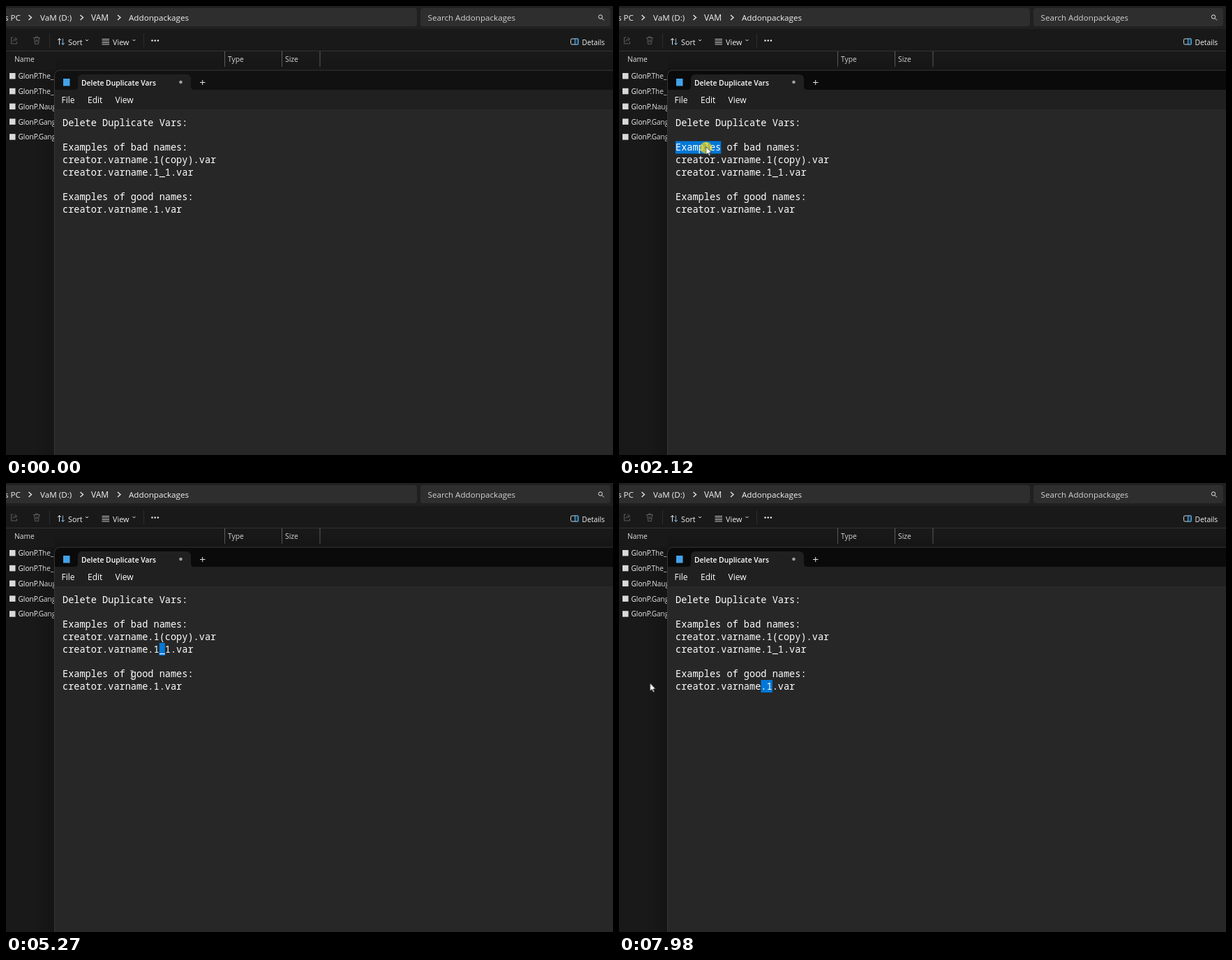
Write an HTML page that moves like this. It is 870 px wide and 643 px high and loops after 8 s.

```html
<!DOCTYPE html>
<html lang="en">
<head>
<meta charset="utf-8">
<title>Delete Duplicate Vars</title>
<style>
html, body { margin: 0; width: 100%; height: 100%; overflow: hidden; background: #191919; }
svg { display: block; width: 870px; height: 643px; fill: #fff; font-family: "Open Sans", "Noto Sans", sans-serif; }
text { white-space: pre; }
.path { font-size: 11.65px; fill: #f2f2f2; }
.tool { font-size: 10.8px; fill: #f2f2f2; }
.head { font-size: 10.3px; fill: #dedede; }
.file { font-size: 10.1px; fill: #f4f4f4; }
.menu { font-size: 12px; }
.tab { font-size: 10.35px; font-weight: 600; }
.note { font-family: "Noto Sans Mono", "DejaVu Sans Mono", monospace; font-size: 13.6px; }
.line { fill: none; stroke: #e4e4e4; stroke-width: 1; }
.dim { stroke: #5c5c5c; }
.thick { stroke-width: 1.4; }

.strip { animation: focus 8s infinite; }
.shadow { animation: shade 8s infinite; }
.sel { fill: #0078d7; height: 18px; animation: select 8s step-end infinite; }
.cursor { animation: move 8s linear infinite; }
.halo { animation: press 8s step-end infinite; }
.arrow { animation: arrow 8s step-end infinite; }
.beam { animation: beam 8s step-end infinite; }

@keyframes focus { 0%, 2% { fill: #111; } 6%, 100% { fill: #0a0a0a; } }
@keyframes shade { 0%, 2% { opacity: .7; } 6%, 100% { opacity: 1; } }

@keyframes select {
  0% { x: 81px; y: 158px; width: 0; }
  12.5% { x: 81px; y: 158px; width: 49px; }
  13.6% { x: 81px; y: 158px; width: 130.6px; }
  15.5% { x: 81px; y: 158px; width: 171.4px; }
  24.9% { x: 81px; y: 193.5px; width: 0; }
  25.9% { x: 81px; y: 193.5px; width: 65.3px; }
  27.4% { x: 81px; y: 193.5px; width: 89.8px; }
  28.2% { x: 81px; y: 193.5px; width: 122.4px; }
  29.1% { x: 81px; y: 193.5px; width: 171.4px; }
  42.1% { x: 219.7px; y: 211px; width: 0; }
  43% { x: 219.7px; y: 211px; width: 8.2px; }
  43.9% { x: 219.7px; y: 211px; width: 24.5px; }
  44.7% { x: 219.7px; y: 211px; width: 40.8px; }
  45.5% { x: 219.7px; y: 211px; width: 49px; }
  57.5% { x: 219.7px; y: 229px; width: 0; }
  58.6% { x: 219.7px; y: 229px; width: 8.2px; }
  72.9% { x: 89.2px; y: 264px; width: 0; }
  74.2% { x: 89.2px; y: 264px; width: 24.5px; }
  75.1% { x: 89.2px; y: 264px; width: 75px; }
  76% { x: 89.2px; y: 264px; width: 122.4px; }
  76.9% { x: 89.2px; y: 264px; width: 163.2px; }
  77.7% { x: 89.2px; y: 264px; width: 188px; }
  85.4% { x: 203.5px; y: 282px; width: 0; }
  87.1% { x: 203.5px; y: 282px; width: 8.2px; }
  88%, 100% { x: 203.5px; y: 282px; width: 16.3px; }
}

@keyframes move {
  0%, .86% { transform: translate(800px, 670px); }
  .87% { transform: translate(775px, 612px); }
  5.6%, 7.2% { transform: translate(45px, 74px); }
  10.4% { transform: translate(88px, 110px); }
  11.75% { transform: translate(84px, 166px); }
  12.5% { transform: translate(95px, 167px); }
  16.3%, 20.5% { transform: translate(244.5px, 164px); }
  24.6%, 25.2% { transform: translate(85px, 203px); }
  30% { transform: translate(230px, 203px); }
  30.9%, 35.1% { transform: translate(239px, 202px); }
  41%, 42.5% { transform: translate(222px, 220px); }
  45.5%, 48.8% { transform: translate(273px, 220px); }
  48.9%, 52.2% { transform: translate(268px, 222px); }
  57%, 57.6% { transform: translate(221px, 241px); }
  59.1%, 63.5% { transform: translate(228px, 243px); }
  65.8% { transform: translate(182px, 274px); }
  68.5% { transform: translate(130px, 282px); }
  72%, 73.4% { transform: translate(91px, 275px); }
  78.2% { transform: translate(287px, 278px); }
  81.1%, 82.8% { transform: translate(224px, 298px); }
  85%, 86% { transform: translate(205px, 295px); }
  89.7%, 92% { transform: translate(229px, 294px); }
  99.6%, 100% { transform: translate(44.5px, 288px); }
}

@keyframes press {
  0%, 20.5%, 35.1%, 48.9%, 61.6%, 78.6%, 92.2%, 100% { visibility: hidden; }
  11.75%, 24.9%, 42.1%, 57.5%, 72.9%, 85.4% { visibility: visible; }
}
@keyframes arrow {
  0%, 20.5%, 35.1%, 48.9%, 61.6%, 78.6%, 92.2% { visibility: hidden; }
  5.2%, 24.9%, 42.1%, 57.5%, 72.9%, 85.4%, 98.3%, 100% { visibility: visible; }
}
@keyframes beam {
  0%, 20.5%, 35.1%, 48.9%, 61.6%, 78.6%, 92.2% { visibility: visible; }
  5.2%, 24.9%, 42.1%, 57.5%, 72.9%, 85.4%, 98.3%, 100% { visibility: hidden; }
}
</style>
</head>
<body>
<svg viewBox="0 0 870 643">
  <defs>
    <linearGradient id="fadeX"><stop offset="0" stop-opacity="0"/><stop offset="1" stop-opacity=".18"/></linearGradient>
    <linearGradient id="fadeY" x2="0" y2="1"><stop offset="0" stop-opacity="0"/><stop offset="1" stop-opacity=".14"/></linearGradient>
    <clipPath id="list"><path d="M0 88H70V643H0Z"/></clipPath>
    <path id="next" class="line thick" d="M-2 -3.5L2 0L-2 3.5"/>
    <path id="drop" class="line" d="M-2 -1L0 1L2 -1"/>
    <rect id="icon" x="5" width="8.5" height="8.5" fill="#d9d9d9"/>
  </defs>

  <!-- file explorer -->
  <rect width="870" height="643" fill="#191919"/>
  <rect width="870" height="33" fill="#202020"/>
  <path d="M0 3H585a4 4 0 0 1 4 4V25a4 4 0 0 1 -4 4H0Z" fill="#2e2e2e"/>
  <rect x="594" y="3" width="272" height="26" rx="4" fill="#2e2e2e"/>
  <g class="path">
    <text x="-2" y="21">s PC</text>
    <text x="49" y="21">VaM (D:)</text>
    <text x="122" y="21" font-size="12">VAM</text>
    <text x="176" y="21">Addonpackages</text>
    <text x="604.5" y="21" fill="#d2d2d2">Search Addonpackages</text>
  </g>
  <use href="#next" x="34.5" y="16.5"/>
  <use href="#next" x="108.5" y="16.5"/>
  <use href="#next" x="162" y="16.5"/>
  <g class="line"><circle cx="852" cy="15.5" r="2.7"/><path d="M854 17.5L857 20.5"/></g>

  <g class="line dim">
    <path d="M10 45H7.5V54H15.5V51M9.5 51Q10 47.5 14 47.5M12.5 45L16 47.5L12.5 50"/>
    <path d="M39 45.5H49M40.5 45.5L41.5 54.5H46.5L47.5 45.5M42.5 45.5V44H45.5V45.5M43 48V52M45 48V52"/>
  </g>
  <path class="line" d="M62.5 39V59M197.5 39V59" style="stroke:#2d2d2d"/>
  <path class="line" d="M76.5 55.5V46.5M74 49L76.5 46.5L79 49"/>
  <path class="line" d="M81.5 46.5V55.5M79.5 53L81.5 55.5L84 53" style="stroke:#7fb6dc"/>
  <path class="line" d="M137.5 47.5H148M137.5 50H148M137.5 52.5H148M137.5 55H148" style="stroke:#c8c8c8"/>
  <use href="#drop" x="116" y="49"/>
  <use href="#drop" x="183.5" y="49"/>
  <g fill="#f0f0f0"><circle cx="209.5" cy="49.5" r="1.2"/><circle cx="213.7" cy="49.5" r="1.2"/><circle cx="217.9" cy="49.5" r="1.2"/></g>
  <text class="tool" x="89" y="56">Sort</text>
  <text class="tool" x="153" y="56">View</text>
  <text class="tool" x="825.5" y="56" style="font-size:10.3px">Details</text>
  <rect class="line" x="809.5" y="47" width="10.5" height="8" rx="1.5" style="stroke:#d0d0d0"/>
  <rect x="815.5" y="47" width="4.5" height="8" fill="#123a55" stroke="#58b2ec"/>

  <rect y="64" width="870" height="1" fill="#343434"/>
  <path class="line" d="M313.5 65V87M395.5 65V87M450 65V87" style="stroke:#5e5e5e"/>
  <text class="head" x="12" y="80">Name</text>
  <text class="head" x="318" y="80">Type</text>
  <text class="head" x="400" y="80">Size</text>

  <g class="file" clip-path="url(#list)">
    <use href="#icon" y="96"/>
    <use href="#icon" y="117.8"/>
    <use href="#icon" y="139.6"/>
    <use href="#icon" y="161.4"/>
    <use href="#icon" y="183.2"/>
    <text x="17.5" y="104.2">GlonP.The_</text>
    <text x="17.5" y="126">GlonP.The_</text>
    <text x="17.5" y="147.8">GlonP.Naught</text>
    <text x="17.5" y="169.6">GlonP.Gang</text>
    <text x="17.5" y="191.4">GlonP.Gang</text>
  </g>

  <!-- text editor -->
  <g class="shadow">
    <rect x="41" y="92" width="29" height="551" fill="url(#fadeX)"/>
    <rect x="70" y="71" width="800" height="21" fill="url(#fadeY)"/>
  </g>
  <path class="strip" d="M70 643V99a7 7 0 0 1 7 -7H870V643Z"/>
  <rect x="70" y="120" width="800" height="28" fill="#202020"/>
  <rect x="70" y="148" width="800" height="495" fill="#272727"/>
  <path d="M98 120Q103 120 103 115V104a6 6 0 0 1 6 -6H259a6 6 0 0 1 6 6V115Q265 120 270 120Z" fill="#202020"/>
  <path class="line" d="M69.5 643V99.5a7.5 7.5 0 0 1 7.5 -7.5H870" style="stroke:#363636"/>
  <rect x="82" y="104" width="9.5" height="10.5" fill="#43a2e8"/>
  <text class="tab" x="108" y="114">Delete Duplicate Vars</text>
  <circle cx="250.5" cy="109" r="2.3" fill="#a0a0a0"/>
  <path class="line" d="M278 109.5H285.5M281.7 106V113"/>
  <g class="menu">
    <text x="79.5" y="139">File</text>
    <text x="117" y="139">Edit</text>
    <text x="156.5" y="139">View</text>
  </g>

  <rect class="sel" x="81" y="158" width="0"/>
  <g class="note">
    <text x="81" y="171.7">Delete Duplicate Vars:</text>
    <text x="81" y="207.1">Examples of bad names:</text>
    <text x="81" y="224.8">creator.varname.1(copy).var</text>
    <text x="81" y="242.5">creator.varname.1_1.var</text>
    <text x="81" y="277.9">Examples of good names:</text>
    <text x="81" y="295.6">creator.varname.1.var</text>
  </g>

  <g class="cursor">
    <circle class="halo" r="8.5" fill="#f5d714" fill-opacity=".7"/>
    <path class="arrow" d="M0 -1.5V10L2.7 7.6L4.5 11.7L6.4 10.9L4.6 6.9H8Z" fill="#fff" stroke="#111" stroke-width=".7"/>
    <path class="line beam" d="M-2 -5.5H-.8L0 -5L.8 -5.5H2M0 -5V5M-2 5.5H-.8L0 5L.8 5.5H2"/>
  </g>
</svg>
</body>
</html>
```
